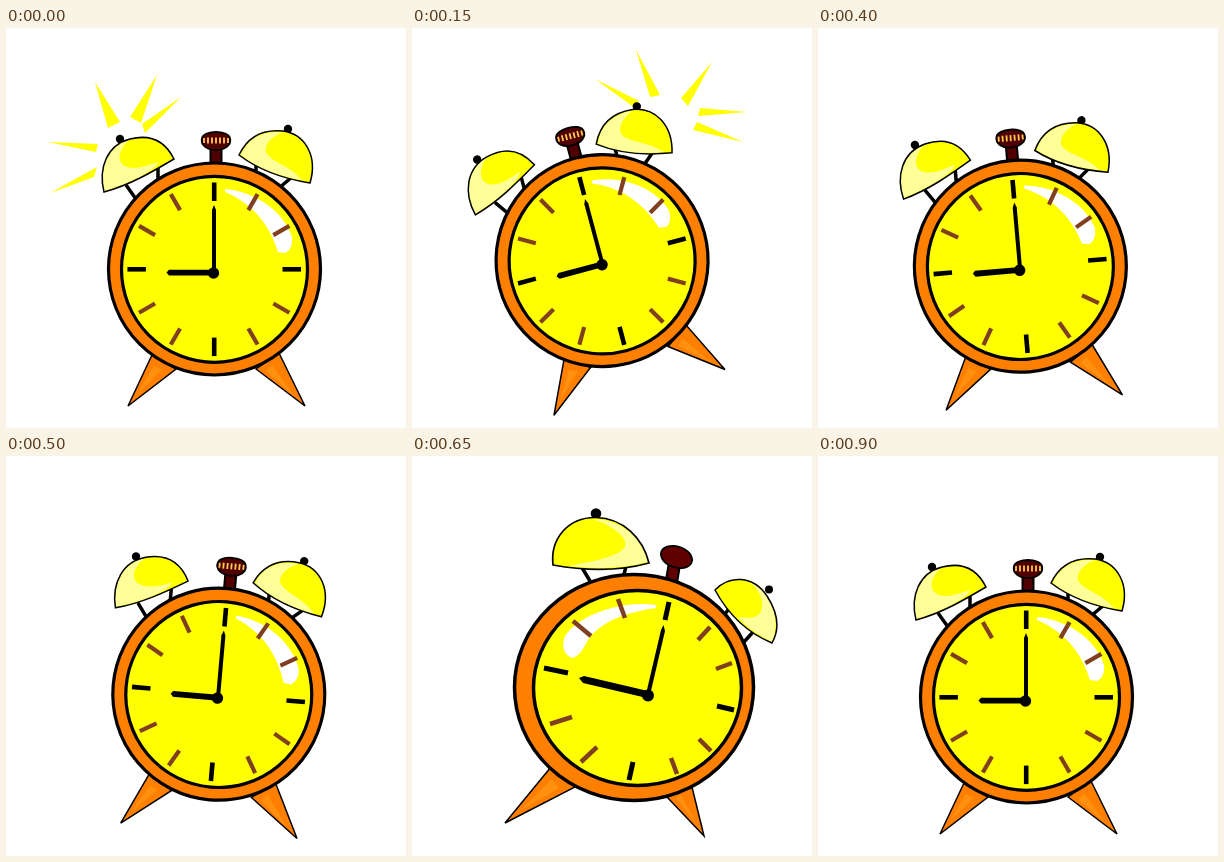
An HTML page for the animation above (0.95 s loop, 400x400 px).

```html
<!DOCTYPE html>
<html>
<head>
<meta charset="utf-8">
<title>Alarm clock</title>
<style>
html, body { margin: 0; width: 100%; height: 100%; overflow: hidden; background: #fff; }
svg { display: block; width: 100vw; height: 100vh; }
</style>
</head>
<body>
<svg viewBox="0 0 400 400">
  <g id="clock">
    <g id="raysLeft" fill="#ff0">
      <path d="M89 54L114 94L102 100ZM151 47L124 89L135 95ZM175 69L136 96L139 105ZM42 114L92 116L90 124ZM44 165L91 139L88 149Z"/>
    </g>
    <g id="raysRight" fill="#ff0" transform="translate(208.5 241) rotate(15) translate(-190 -232.7)">
      <path d="M183 51L227 73L223 80ZM224 22L238 69L248 67ZM300 34L269 70L276 78ZM335 84L288 80L286 88ZM331 114L285 94L281 102Z"/>
    </g>
    <g stroke="#000" stroke-width="1.5" fill="#ff8000">
      <path d="M146 327L122 378L170 341Z"/>
      <path d="M250 341L299 378L273 325Z"/>
    </g>
    <path d="M148 338L132 365L156 342ZM260 343L288 368L266 337Z" fill="#ff9010"/>
    <path d="M120 157L130 171M152 140L152 154M250 136L250 147M286 149L273 160" stroke="#000" stroke-width="3.5"/>
    <path d="M204.5 119h11v17h-11z" fill="#500000" stroke="#000" stroke-width="2"/>
    <path d="M196 110C198 102 222 102 224 110C226 117 219 122 210 122C201 122 194 117 196 110Z" fill="#500000" stroke="#000" stroke-width="1.8"/>
    <path d="M198 110v5M202 109.500v6M206 109.500v6M210 109.500v6M214 109.500v6M218 109.500v6M222 110v5" stroke="#ffc850" stroke-width="1.8"/>
    <circle cx="114" cy="111" r="4.2"/>
    <path d="M98 164C92 140 101 117 124 111C144 106 159 113 168 131C146 144 124 157 98 164Z" fill="#ff0"/>
    <path d="M98 163C93 140 102 118 123 112C113 121 110 133 119 138C129 143 143 137 152 134C150 142 124 156 98 163Z" fill="#ffff99"/>
    <path d="M98 164C92 140 101 117 124 111C144 106 159 113 168 131C146 144 124 157 98 164Z" fill="none" stroke="#000" stroke-width="1.5"/>
    <circle cx="282" cy="101" r="4.2"/>
    <path d="M233 127C242 108 258 101 277 103C299 106 312 128 304 155C279 151 254 143 233 127Z" fill="#ff0"/>
    <path d="M235 127C242 109 257 103 277 104C266 108 256 118 261 126C268 135 284 138 296 152C275 149 252 141 235 127Z" fill="#ffff99"/>
    <path d="M233 127C242 108 258 101 277 103C299 106 312 128 304 155C279 151 254 143 233 127Z" fill="none" stroke="#000" stroke-width="1.5"/>
    <circle cx="208.5" cy="241" r="106" fill="#ff8000" stroke="#000" stroke-width="3.2"/>
    <circle cx="208.5" cy="241.3" r="93" fill="#ff0" stroke="#000" stroke-width="3.2"/>
    <path d="M219 161C246 163 277 181 286 209C287 217 284 223 279 225L272 224C265 201 250 177 219 164Z" fill="#fff"/>
    <g id="ticks"></g>
    <path d="M206 245V182L208 177L210 182V245Z"/>
    <path d="M208 247.5H163L160.5 244.5L163 241.7H208Z"/>
    <circle cx="207.5" cy="245" r="5.7"/>
  </g>

  <g id="lean">
    <g stroke="#000" stroke-width="1.5" fill="#ff8000">
      <path d="M139 311L93 367L165 330Z"/>
      <path d="M255 341L292 380L280 331Z"/>
    </g>
    <path d="M140 323L108 355L147 332ZM264 342L284 367L269 339Z" fill="#ff9010"/>
    <path d="M169 110L178 125M214 110L211 123M319 150L310 162M342 175L331 187" stroke="#000" stroke-width="3.5"/>
    <path d="M257 106L268 109L265 127L254 124Z" fill="#600000" stroke="#000" stroke-width="2"/>
    <ellipse cx="264.5" cy="101" rx="16" ry="10.5" transform="rotate(18 264.5 101)" fill="#600000" stroke="#000" stroke-width="1.8"/>
    <circle cx="184" cy="57.5" r="5.3"/>
    <path d="M141 109C138 83 156 61 184 61.5C211 62 231 82 237 107C208 115 174 115 141 109Z" fill="#ff0"/>
    <path d="M181 63C211 64 231 83 236 106C210 113 182 113 158 110C184 104 208 101 213 90C216 80 198 69 181 63Z" fill="#ffff99"/>
    <path d="M141 109C138 83 156 61 184 61.5C211 62 231 82 237 107C208 115 174 115 141 109Z" fill="none" stroke="#000" stroke-width="1.7"/>
    <circle cx="357" cy="133.5" r="4"/>
    <path d="M303 134C317 119 341 119 355 140C366 157 368 173 360 187C336 177 316 158 303 134Z" fill="#ff0"/>
    <path d="M335 124C358 128 370 163 360 186C349 181 335 172 326 161C338 163 350 162 350 150C351 140 344 130 335 124Z" fill="#ffff99"/>
    <path d="M303 134C317 119 341 119 355 140C366 157 368 173 360 187C336 177 316 158 303 134Z" fill="none" stroke="#000" stroke-width="1.5"/>
    <ellipse cx="222" cy="231.5" rx="119.5" ry="113" fill="#ff8000" stroke="#000" stroke-width="3.5"/>
    <ellipse cx="225.5" cy="232" rx="104" ry="97.5" fill="#ff0" stroke="#000" stroke-width="3.5"/>
    <path d="M244 149C213 144 168 157 153 180C149 190 152 199 160 202C168 200 171 193 176 184C188 166 214 156 244 152Z" fill="#fff"/>
    <g stroke-width="5" fill="none">
      <path d="M257 146L253 164M132 212L156 217M221 306L217 324M305 250L322 254" stroke="#000"/>
      <path d="M206 143L213 162M161 165L179 180M138 268L160 261M169 306L185 291M259 302L265 318M287 283L299 295M286 184L298 171M304 213L320 207" stroke="#804020" stroke-width="4.5"/>
    </g>
    <path d="M234 238L249 174L251.5 169L253 175L238 239Z"/>
    <path id="hourLeft" d="M235 242L171 227L167 222L172 220L236 235Z"/>
    <path id="hourRight" d="M236 235L288 247L291 251L287 253L235 242Z"/>
    <circle cx="236" cy="239.5" r="6"/>
  </g>
</svg>
<script>
const el = id => document.getElementById(id);
const show = (id, on) => el(id).setAttribute("display", on ? "inline" : "none");

let marks = "";
for (let h = 0; h < 12; h++) {
  const main = h % 3 === 0;
  marks += `<path d="M208.2 154.5v18.5" stroke="${main ? "#000" : "#804020"}" ` +
    `stroke-width="${main ? 4.6 : 4.2}" transform="rotate(${h * 30} 208.2 241.3)"/>`;
}
el("ticks").innerHTML = marks;

const LOOP = 950, STEP = 50, TILT = 5;
// Tilt steps; 4 and -4 are the leaning extremes.
const swing = [0, -1, -2, -3, -4, -4, -3, -2, -1, 0, 1, 2, 3, 4, 4, 3, 2, 1, 0];

function draw(t) {
  const i = Math.floor((t % LOOP) / STEP);
  const s = swing[i];
  const far = Math.abs(s) === 4;
  show("clock", !far);
  show("lean", far);
  if (far) {
    el("lean").setAttribute("transform", s < 0 ? "translate(412 0) scale(-1 1)" : "");
    show("hourLeft", s > 0);
    show("hourRight", s < 0);
    return;
  }
  const x = 208.5 + s * (s < 0 ? 6.15 : 4.3);
  const y = 241 - Math.abs(s) * 2.8;
  el("clock").setAttribute("transform",
    `translate(${x} ${y}) rotate(${s * TILT}) translate(-208.5 -241)`);
  show("raysLeft", i < 2);
  show("raysRight", i === 2 || i === 3);
}

const start = performance.now();
function tick() {
  draw(performance.now() - start);
  requestAnimationFrame(tick);
}
draw(0);
requestAnimationFrame(tick);
</script>
</body>
</html>
```
